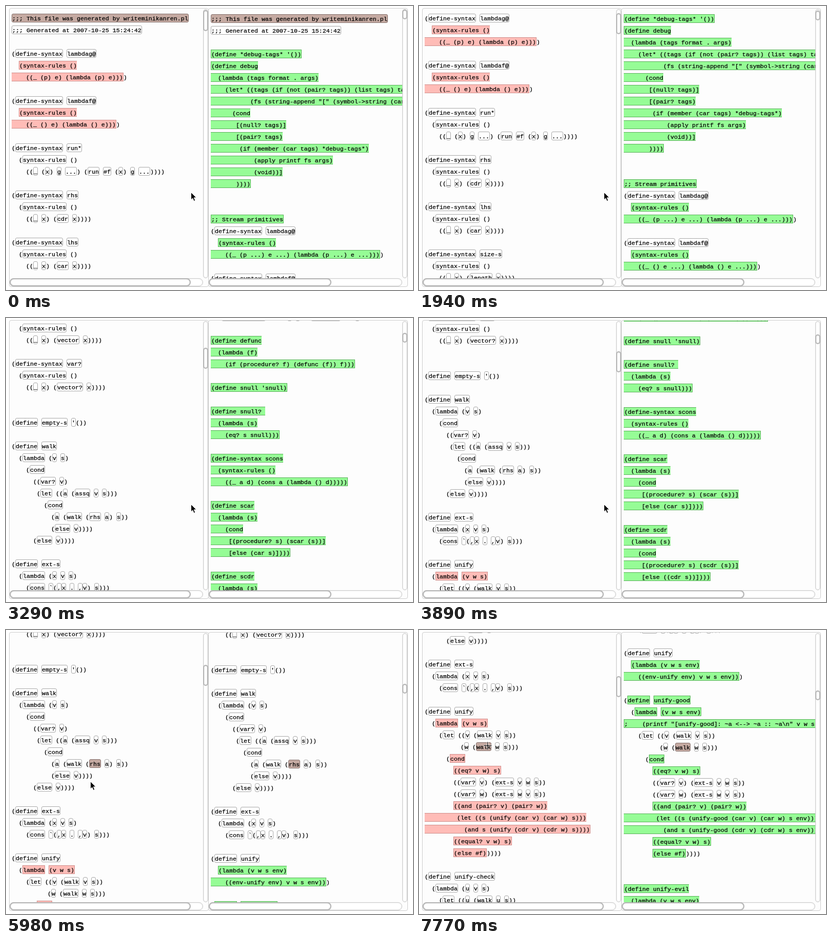
Write an HTML page that moves like this. It is 793x554 px and loops after 8000 ms.

```html
<!DOCTYPE html>
<html lang="en">
<head>
<meta charset="utf-8">
<title>Side-by-side code diff</title>
<style>
  html, body { margin: 0; width: 100%; height: 100%; overflow: hidden; background: #fff; }
  body { position: relative; }
  .pane { position: absolute; top: 4px; width: 389px; height: 544px; box-sizing: border-box;
    border: 1px solid #ccc; border-radius: 4px; background: #fdfdfd; }
  #left { left: 6px; --hl: #ffbcb7; --edge: #cf8d8a; }
  #right { left: 394px; --hl: #96fc96; --edge: #58b058; }
  .view { position: absolute; left: 0; top: 0; width: 377px; height: 526px; overflow: hidden; }
  .doc { position: absolute; left: 4px; top: 40px; color: #000;
    font: 11.667px/20px "Liberation Mono", "Courier New", monospace; -webkit-text-stroke: .25px; }
  #right .doc { top: 41px; }
  .row { height: 23px; white-space: pre; }
  .row span { display: inline-block; height: 13px; padding-top: 2px; line-height: 14px; border: 1px solid #a8a8a8; }
  .row .tok { border-radius: 3px; background: #fff; }
  .row .hl { background: var(--hl); border-color: var(--edge); border-left: 0; border-right: 0; }
  .row .start { border-left: 1px solid var(--edge); }
  .row .end { border-right: 1px solid var(--edge); }
  .row .on { background: #c5aaa2; border-color: #84706c; }
  .bar { position: absolute; box-sizing: border-box; border: 1px solid #ccc; border-radius: 8px;
    background: #fff; box-shadow: inset 0 0 2px #ccc; }
  .thumb { border: 2px solid #b4b4b4; }
  .v { left: 377px; top: 1px; width: 10px; height: 525px; border-radius: 5px; }
  .h { left: 0; top: 526px; width: 377px; height: 16px; }
  #left .v.thumb { height: 41px; }
  #right .v.thumb { height: 19px; }
  #left .h.thumb { width: 353px; }
  #right .h.thumb { width: 239px; }
  #cursor { position: absolute; left: 0; top: 0; overflow: visible; }
</style>
</head>
<body>
<div class="pane" id="left"></div>
<div class="pane" id="right"></div>
<svg id="cursor" width="1" height="1">
  <path id="arrow" d="M0 0V14.5L3.3 11.4 5.7 17 8.2 16 5.9 10.4H10.4Z" fill="#000" stroke="#fff"/>
  <g id="cross" fill="none">
    <path d="M-7 0H8M0 -7V8" stroke="#fff" stroke-width="3" opacity=".6"/>
    <path d="M-7 0H8M0 -7V8" stroke="#000"/>
  </g>
</svg>

<!-- {…} is a changed range, ^ marks the tokens that get selected in turn -->
<script type="text/plain" id="leftHead">
^;;; This file was generated by writeminikanren.pl
;;; Generated at 2007-10-25 15:24:42

(define-syntax lambdag@
  {(syntax-rules ()
    ((_ (p) e) (lambda (p) e)))})

(define-syntax lambdaf@
  {(syntax-rules ()
    ((_ () e) (lambda () e)))})

</script>
<script type="text/plain" id="rightHead">
^;;; This file was generated by writeminikanren.pl
;;; Generated at 2007-10-25 15:24:42

{(define *debug-tags* '())}
{(define debug
  (lambda (tags format . args)
    (let* ((tags (if (not (pair? tags)) (list tags) tags))
           (fs (string-append "[" (symbol->string (car tags)) "] " format)))
      (cond
       [(null? tags)]
       [(pair? tags)
        (if (member (car tags) *debug-tags*)
            (apply printf fs args)
            (void))]
       ))))}


{;; Stream primitives}
(define-syntax lambdag@
  {(syntax-rules ()
    ((_ (p ...) e ...) (lambda (p ...) e ...)))})

(define-syntax lambdaf@
  {(syntax-rules ()
    ((_ () e ...) (lambda () e ...)))})

(define-syntax inc
  (syntax-rules () ((_ e) (lambdaf@ () e))))

{(define defunc
  (lambda (f)
    (if (procedure? f) (defunc (f)) f)))}

{(define snull 'snull)}

{(define snull? 
  (lambda (s)
    (eq? s snull)))}

{(define-syntax scons
  (syntax-rules ()
    ((_ a d) (cons a (lambda () d)))))}

{(define scar
  (lambda (s)
    (cond
     [(procedure? s) (scar (s))]
     [else (car s)])))}

{(define scdr
  (lambda (s)
    (cond
     [(procedure? s) (scdr (s))]
     [else ((cdr s))])))}

{(define-syntax sunit
  (syntax-rules ()
    ((_ a) (scons a snull))))}

{(define slift
  (lambda (f)
    (lambda args
      (sunit (apply f args)))))}

{(define-syntax make-stream
  (syntax-rules ()
    ((_) snull)
    ((_ e1 e2 ...) (scons e1 (make-stream e2 ...)))))}

(define take
  ({lambda} {(n s)}
    (if (and n (zero? n))
        '()
        ({let} {([s (defunc s)])}
          ({cond}
           {[(snull? s) '()]}
           {[else (cons (scar s)
                   (take (and n (- n 1)) (scdr s)))]})))))

{(define snoc
  (lambda (s a)
    (cond
     [(snull? s) (sunit a)]
     [else (scons (scar s) (snoc (scdr s) a))])))}

{(define smap
  (lambda (f s)
    (cond
     [(snull? s) snull]
     [else (scons (f (scar s)) (smap f (scdr s)))])))}

{(define sappend
  (lambda (s1 s2)
    (cond
     [(snull? s1) s2]
     [else (scons (scar s1) (sappend (scdr s1) s2))])))}

{(define sfind
  (lambda (p s)
    (if (p (scar s)) (scar s)
        (sfind p (scdr s)))))}

</script>
<script type="text/plain" id="shared">
(define-syntax run*
  (syntax-rules ()
    ((_ (x) g ...) (run #f (x) g ...))))

(define-syntax rhs
  (syntax-rules ()
    ((_ x) (cdr x))))

(define-syntax lhs
  (syntax-rules ()
    ((_ x) (car x))))

(define-syntax size-s
  (syntax-rules ()
    ((_ x) (length x))))

(define-syntax var
  (syntax-rules ()
    ((_ x) (vector x))))

(define-syntax var?
  (syntax-rules ()
    ((_ x) (vector? x))))


(define empty-s '())

(define walk
  (lambda (v s)
    (cond
      ((var? v)
       (let ((a (assq v s)))
         (cond
           (a (walk (^rhs a) s))
           (else v))))
      (else v))))

(define ext-s
  (lambda (x v s)
    (cons `(,x . ,v) s)))

</script>
<script type="text/plain" id="leftTail">
(define unify
  ({lambda} {(v w s)}
    (let ((v (walk v s))
          (w (^walk w s)))
      ({cond}
        {((eq? v w) s)}
        ((var? v) (ext-s v w s))
        ((var? w) (ext-s w v s))
        {((and (pair? v) (pair? w))
         (let ((s (unify (car v) (car w) s)))
           (and s (unify (cdr v) (cdr w) s))))}
        {((equal? v w) s)}
        {(else #f)}))))

(define unify-check
  (lambda (u v s)
    (let ((u (walk u s))
          (v (walk v s)))
</script>
<script type="text/plain" id="rightTail">
(define unify
  {(lambda (v w s env)
    ((env-unify env) v w s env))})

({define} {unify-good}
  ({lambda} {(v w s env)}
{;    (printf "[unify-good]: ~a <--> ~a :: ~a\n" v w s)}
    (let ((v (walk v s))
          (w (^walk w s)))
      ({cond}
        {((eq? v w) s)}
        ((var? v) (ext-s v w s))
        ((var? w) (ext-s w v s))
        {((and (pair? v) (pair? w))
         (let ((s (unify-good (car v) (car w) s env)))
           (and s (unify-good (cdr v) (cdr w) s env))))}
        {((equal? v w) s)}
        {(else #f)}))))


{(define unify-evil
  (lambda (v w s env)
    (let ((v (walk v s))
          (w (walk w s)))}
</script>

<script>
const $ = id => document.getElementById(id);

function add(parent, cls, text = '', tag = 'div') {
  const el = document.createElement(tag);
  el.className = cls;
  el.textContent = text;
  return parent.appendChild(el);
}

function fillRows(doc, text) {
  const marks = [];
  let open = false, edge = '';
  for (const line of text.split('\n')) {
    const row = add(doc, 'row');
    for (const part of line.split(/([{}])/)) {
      if (part === '{') { open = true; edge = ' start'; }
      else if (part === '}') { open = false; row.lastChild.classList.add('end'); }
      else if (open) {
        if (part) { add(row, 'hl' + edge, part, 'span'); edge = ''; }
      } else for (const piece of part.match(/[\s()[\]]+|\^?(;.*|['`,]|[^\s()[\]'`,]+)/g) || []) {
        if (/^[\s()[\]]/.test(piece)) { row.append(piece); continue; }
        const token = add(row, 'tok', piece.replace('^', ''), 'span');
        if (piece[0] === '^') marks.push(token);
      }
    }
  }
  return marks;
}

function makePane(id, thumbRate) {
  const pane = $(id), doc = add(add(pane, 'view'), 'doc');
  const text = [id + 'Head', 'shared', id + 'Tail'].map(s => $(s).textContent.slice(1)).join('');
  const marks = fillRows(doc, text);
  add(pane, 'bar v');
  add(pane, 'bar h');
  add(pane, 'bar thumb h');
  const thumb = add(pane, 'bar thumb v');
  return (scroll, selected) => {
    doc.style.transform = `translateY(${-scroll}px)`;
    thumb.style.transform = `translateY(${Math.round(scroll * thumbRate)}px)`;
    marks.forEach((m, i) => m.classList.toggle('on', i === selected));
  };
}

// Linear interpolation between [step, value] keys
function at(keys, n) {
  const i = keys.findIndex(k => k[0] >= n);
  if (i < 0) return keys[keys.length - 1][1];
  if (i === 0) return keys[0][1];
  const [a, u] = keys[i - 1], [b, v] = keys[i];
  return Math.round(u + (v - u) * (n - a) / (b - a));
}

const LOOP = 8000, STEP = 149.3, LAST = 52;
const scrollKeys = [[0, 30], [1, 0], [3, 0], [6, 90], [8, 90], [9, 0], [17, 264], [22, 678],
  [26, 769], [39, 769], [45, 986], [48, 1091]];
const offsetKeys = [[32, 0], [33, 486], [34, 1432], [35, 2060], [36, 2093],
  [49, 2093], [50, 2120], [51, 2172], [52, 2208]];
const cursorX = [[26, 360], [29, 164], [46, 164], [49, 133]];
const cursorY = [[26, 363], [29, 297], [39, 297], [40, 295], [46, 295], [49, 225]];

const drawLeft = makePane('left', .077), drawRight = makePane('right', .0341);

function draw(time) {
  const n = Math.min(LAST, Math.floor(time % LOOP / STEP));
  const scroll = at(scrollKeys, n);
  const selected = n < 29 ? 0 : n < 49 ? 1 : 2;
  const overToken = n >= 29 && n < 40 || n >= 49;
  drawLeft(scroll, selected);
  drawRight(scroll + at(offsetKeys, n), selected);
  $('cursor').style.transform = `translate(${at(cursorX, n) + .5}px, ${at(cursorY, n) + .5}px)`;
  $('arrow').style.display = overToken ? 'none' : '';
  $('cross').style.display = overToken ? '' : 'none';
}

let start;
function tick(now) {
  start ??= now;
  draw(now - start);
  requestAnimationFrame(tick);
}
draw(0);
requestAnimationFrame(tick);
</script>
</body>
</html>
```
